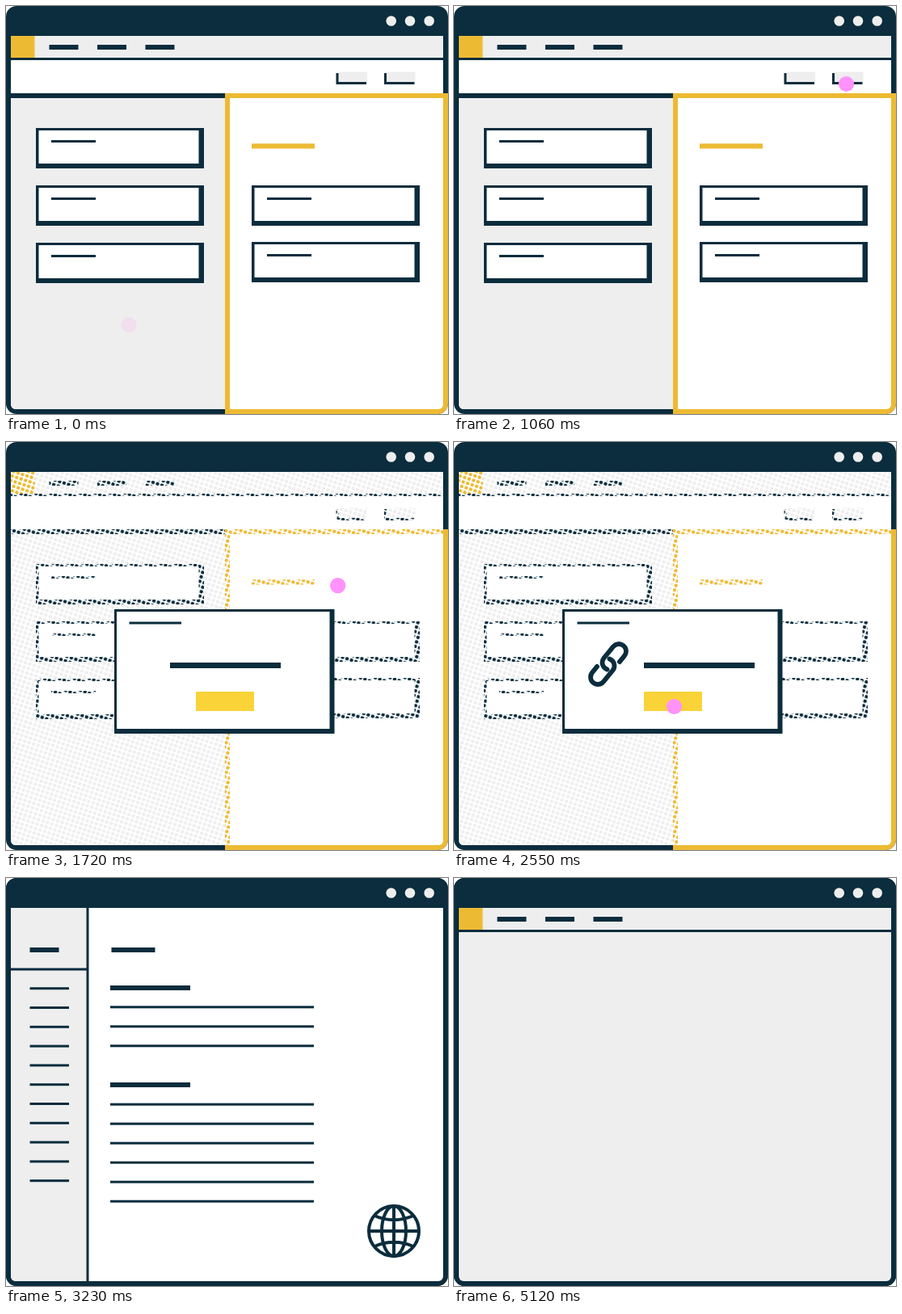
An HTML page for the animation above (5.15 s loop, 547 px wide and 505 px high).

```html
<!DOCTYPE html>
<html lang="en">
<head>
<meta charset="utf-8">
<title>Publishing flow</title>
<style>
  html, body { margin: 0; width: 100%; height: 100%; overflow: hidden; background: #fff; }
  svg { display: block; width: 547px; height: 505px; }
</style>
</head>
<body>
<svg id="stage" viewBox="0 0 547 505"></svg>
<script>
const NAVY = '#0b2d3d', GOLD = '#edba33', GRAY = '#eeeeee', PINK = '#ff92fb';
const LOOP = 5150;

const box = (x1, y1, x2, y2, fill = NAVY) =>
  `<rect x="${x1}" y="${y1}" width="${x2 - x1}" height="${y2 - y1}" fill="${fill}"/>`;
const group = (id, body) => `<g id="${id}">${body}</g>`;
const range = (n, fn) => Array.from({ length: n }, (_, i) => fn(i)).join('');

// Page area with rounded lower corners
const sheet = fill => `<path fill="${fill}" d="M6 37H541V493a6 6 0 0 1-6 6H12a6 6 0 0 1-6-6Z"/>`;
const frame = '<rect width="547" height="505" rx="13" fill="' + NAVY + '"/>';

const header = [476.7, 500, 523.7].map(x =>
  `<circle cx="${x}" cy="18.5" r="6.3" fill="${GRAY}"/>`).join('');

const nav = box(6, 37, 541, 64, GRAY) + box(6, 64, 541, 67) + box(6, 37, 35.5, 64, GOLD) +
  [53.5, 113, 172.5].map(x => box(x, 48, x + 36, 54)).join('');

const button = x => box(x, 83, x + 37.5, 97) + box(x + 3, 81.5, x + 38.5, 94, GRAY);

const card = (x, y) => box(x, y, x + 208, y + 50) +
  box(x + 3.5, y + 3, x + 201.5, y + 44, '#fff') + box(x + 19, y + 15, x + 74, y + 18);

const board = sheet('#fff') + nav + button(408.5) + button(468) +
  `<path fill="${GRAY}" d="M6 114H271V499H12a6 6 0 0 1-6-6Z"/>` + box(6, 108, 271, 114) +
  `<path fill="${GOLD}" d="M271 108H547V492a13 13 0 0 1-13 13H271Z"/>` +
  `<path fill="#fff" d="M277 114H541V493a6 6 0 0 1-6 6H277Z"/>` +
  box(304, 170.3, 382, 176.5, GOLD) +
  card(37, 151) + card(37, 222) + card(37, 293) + card(304, 222) + card(304, 292);

const halftone = `<defs>
  <pattern id="dots" width="5.8" height="5.8" patternUnits="userSpaceOnUse" patternTransform="rotate(18)">
    <circle cx="2.9" cy="2.9" r="2.25" fill="#000"/>
  </pattern>
  <mask id="holes" maskUnits="userSpaceOnUse" x="0" y="0" width="547" height="505">
    ${box(0, 0, 547, 505, '#fff')}${box(0, 0, 547, 505, 'url(#dots)')}
  </mask></defs>`;
const cover = `<g mask="url(#holes)">${sheet('#fff')}</g>`;

const hook = 'M11 9H20.6A9 9 0 0 0 20.6 -9H2A9 9 0 0 0 -6 3';
const chain = `<g transform="translate(191 275) rotate(-51)" fill="none" stroke="${NAVY}"
  stroke-width="5.8" stroke-linecap="round"><path d="${hook}"/><path d="${hook}" transform="rotate(180)"/></g>`;

const modal = box(134, 207, 406.5, 361) + box(137, 210, 400.5, 355, '#fff') +
  box(152.5, 222.5, 217, 225.5) + box(235, 309, 307, 333, '#f9d338') +
  group('chain', chain) + group('bar', box(203, 273, 340, 280));

const globe = `<g transform="translate(480 437)" fill="none" stroke="${NAVY}" stroke-width="4">
  <circle r="31"/><ellipse rx="15" ry="31"/>
  <path d="M0 -31V31M-31 0H31M-24 -19Q0 -8.5 24 -19M-24 19Q0 8.5 24 19"/></g>`;

const line = y => box(129, y - 1.5, 381, y + 1.5);
const doc = frame + sheet('#fff') +
  `<path fill="${GRAY}" d="M6 37H100V499H12a6 6 0 0 1-6-6Z"/>` +
  box(99.5, 37, 102.5, 499) + box(6, 111.5, 100, 114.5) +
  box(29.5, 86, 65.5, 92) + range(11, i => box(29.5, 135.2 + 23.8 * i, 78, 138.2 + 23.8 * i)) +
  box(130.5, 86, 184.5, 92) +
  box(129, 133, 228, 139) + range(3, i => line(159.8 + 24 * i)) +
  box(129, 253, 228, 259) + range(6, i => line(280.2 + 24 * i)) +
  group('globe', globe);

const blank = frame + sheet(GRAY) + nav;

const stage = document.getElementById('stage');
stage.innerHTML = halftone + frame + board + group('cover', cover) + group('modal', modal) +
  `<circle id="dot" fill="${PINK}"/>` + group('doc', doc) + group('blank', blank) + header;

const part = {};
for (const id of ['cover', 'modal', 'chain', 'bar', 'dot', 'doc', 'globe', 'blank'])
  part[id] = document.getElementById(id);

const ramp = (t, a, b) => Math.min(1, Math.max(0, (t - a) / (b - a)));
const ease = p => (1 - Math.cos(Math.PI * p)) / 2;
const mix = (a, b, p) => a + (b - a) * p;
const fade = (el, v) => el.setAttribute('opacity', v);

// Motion advances in 30 ms ticks counted from these moments
const CUES = [0, 130, 1230, 1510, 2220, 2760, 3080, 5060];
function tick(t) {
  const cue = CUES.filter(c => c <= t).pop();
  return cue + Math.floor((t - cue) / 30) * 30;
}

const STOPS = [[152, 394.7], [485.5, 96.5], [272.5, 327.5]];

function draw(now) {
  const t = tick(now % LOOP);

  const first = ease(ramp(t, 530, 1060)), second = ease(ramp(t, 1510, 2030));
  const at = k => mix(mix(STOPS[0][k], STOPS[1][k], first), STOPS[2][k], second);
  part.dot.setAttribute('cx', at(0));
  part.dot.setAttribute('cy', at(1));
  part.dot.setAttribute('r', 9.6 + 3 * Math.sin(Math.PI * ramp(t, 2550, 2760)));
  fade(part.dot, Math.max(0.17, ramp(t, 70, 250)));

  const open = ramp(t, 1200, 1410);
  fade(part.cover, open);
  fade(part.modal, open);

  const slide = ease(ramp(t, 2200, 2520));
  part.bar.setAttribute('transform', `translate(${32 * slide} 0)`);
  part.chain.setAttribute('transform', `translate(${32 * slide - 32} 0)`);
  fade(part.chain, slide);

  fade(part.doc, ramp(t, 2730, 2910));
  fade(part.globe, ramp(t, 3050, 3230));
  fade(part.blank, ramp(t, 5030, 5120));
}

const start = performance.now();
function loop() {
  draw(performance.now() - start);
  requestAnimationFrame(loop);
}
loop();
</script>
</body>
</html>
```
